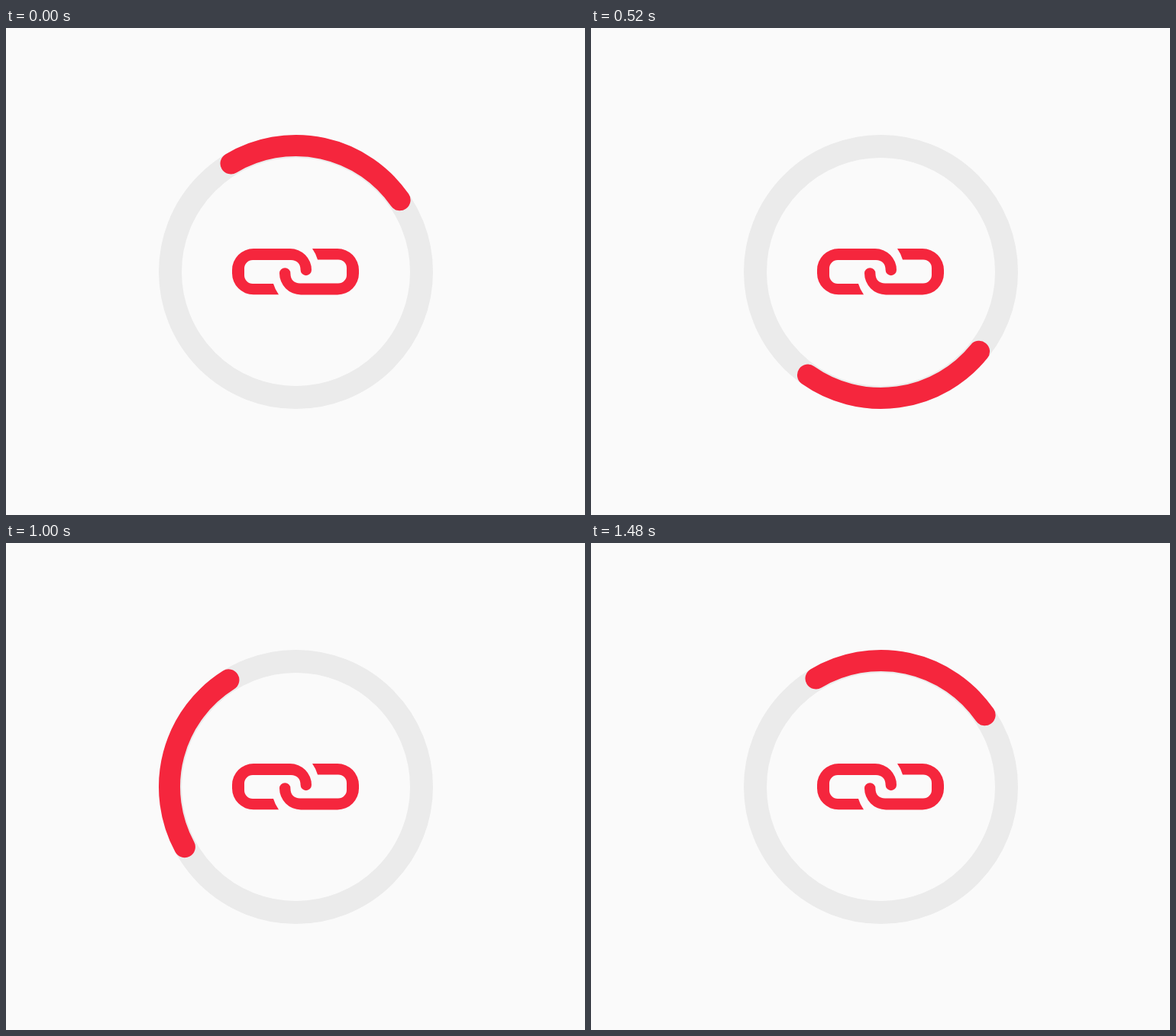
Animation, 758 px wide and 638 px high, one loop 1.52 s. Source, as an HTML page:

```html
<!DOCTYPE html>
<html lang="en">
<head>
<meta charset="utf-8">
<title>Link loader</title>
<style>
  html, body { margin: 0; width: 100%; height: 100%; overflow: hidden; background: #fafafa; }
  svg { display: block; width: 758px; height: 638px; }
  circle { fill: none; }
  .track { stroke: #ebebeb; stroke-width: 30; }
  .arc { stroke: #f5263d; stroke-width: 28; stroke-linecap: round; stroke-dasharray: 86.2 273.8; }
  .icon { fill: #f5263d; }
</style>
</head>
<body>
<svg viewBox="0 0 758 638">
  <defs>
    <path id="half" d="M357 349.3H324A28 28 0 0 1 296 321.3V317A28 28 0 0 1 324 289H372
      A28 28 0 0 1 400 317A7.2 7.2 0 0 1 385.6 317C385.6 309 381 304 373 304H323
      A11 11 0 0 0 312 315V324A11 11 0 0 0 323 335H350Q352 342 357 349.3Z"/>
  </defs>
  <circle class="track" cx="379.5" cy="319.5" r="164.5"/>
  <circle class="arc" id="arc" cx="379.5" cy="319.5" r="165.5" pathLength="360"/>
  <g class="icon">
    <use href="#half"/>
    <use href="#half" transform="rotate(180 379 319.2)"/>
  </g>
</svg>
<script>
  const arc = document.getElementById('arc');
  const TICK = 40, TICKS = 38, LAST = TICKS - 1;
  const START = -120.9;   // tail of the arc, from 3 o'clock
  const SPLIT = 14.63;    // tick at which half a turn is done

  // First half turn at constant speed, second half slowing down.
  function turn(tick) {
    if (tick < SPLIT) return 180 * tick / SPLIT;
    const p = (tick - SPLIT) / (LAST - SPLIT);
    return 180 + 180 * p * (1.203 - 0.203 * p);
  }

  function draw(ms) {
    const tick = Math.floor(ms / TICK + 0.02) % TICKS;
    arc.setAttribute('transform', `rotate(${START + turn(tick)} 379.5 319.5)`);
  }

  let origin;
  function loop(now) {
    origin ??= now;
    draw(now - origin);
    requestAnimationFrame(loop);
  }
  draw(0);
  requestAnimationFrame(loop);
</script>
</body>
</html>
```
